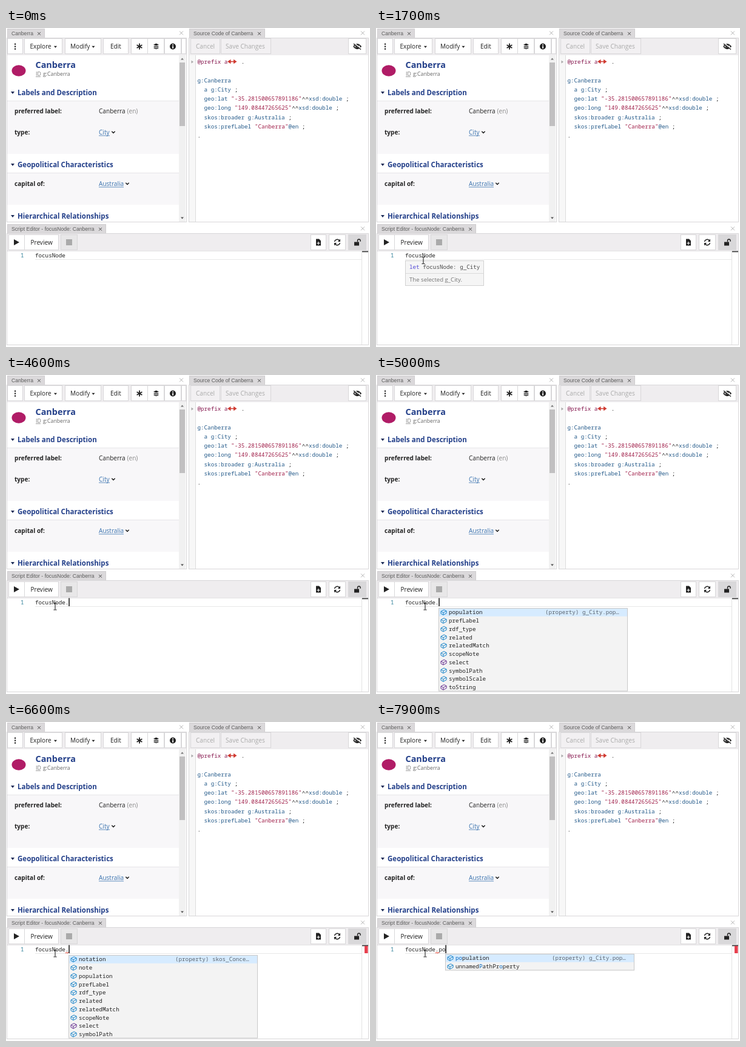
An HTML page with a canvas that plays this animation: 600x527 px, repeating every 8000 ms.

```html
<!DOCTYPE html>
<html lang="en">
<head>
<meta charset="utf-8">
<title>Script editor</title>
<style>
  html, body { margin: 0; width: 600px; height: 527px; overflow: hidden; background: #fff; }
  canvas { display: block; }
</style>
</head>
<body>
<canvas id="stage" width="600" height="527"></canvas>
<script>
const canvas = document.getElementById('stage');
let ctx = canvas.getContext('2d');

const SANS = '"Open Sans", sans-serif';
const BODY = `10.08px ${SANS}`;
const BOLD = `bold 10.08px ${SANS}`;
const TAB = '8.64px "Liberation Sans", sans-serif';
const CODE = '9.24px "Noto Sans Mono", monospace';
const CHAR = 5.56;
const INK = '#222', NAVY = '#24408a', LINK = '#3b73af', LINE = '#d8d7d9', BAR = '#efedef';
const LOOP = 8000;

function text(s, x, y, font = BODY, color = INK) {
  ctx.font = font;
  ctx.fillStyle = color;
  ctx.fillText(s, x, y);
}

// Alternating text and colour, one after another on the code grid.
function code(x, y, ...runs) {
  for (let i = 0; i < runs.length; i += 2) {
    text(runs[i], x, y, CODE, runs[i + 1]);
    x += runs[i].length * CHAR;
  }
}

function rect(x, y, w, h, fill, stroke) {
  if (fill) { ctx.fillStyle = fill; ctx.fillRect(x, y, w, h); }
  if (stroke) {
    ctx.strokeStyle = stroke;
    ctx.lineWidth = 1;
    ctx.strokeRect(x + .5, y + .5, w - 1, h - 1);
  }
}

function path(d, x, y, color, width) {
  const p = new Path2D(d);
  ctx.save();
  ctx.translate(x, y);
  if (width) {
    ctx.strokeStyle = color;
    ctx.lineWidth = width;
    ctx.stroke(p);
  } else {
    ctx.fillStyle = color;
    ctx.fill(p);
  }
  ctx.restore();
}

const cross = (x, y, r, color) => path(`M${-r} ${-r}L${r} ${r}M${r} ${-r}L${-r} ${r}`, x, y, color, 1);
const caretDown = (x, y, size = 2.6) => path(`M${-size} -1.3H${size}L0 1.7Z`, x, y, INK);
const chevron = (x, y) => path('M-2.7 -1.3L0 1.4L2.7 -1.3', x, y, INK, 1.5);

function tab(x, y, w, label, closeX) {
  rect(x, y, w, 16, '#dbd9db', '#cfcdcf');
  text(label, x + 7, y + 11.4, TAB, '#5c5c5c');
  cross(x + w - 9.5, y + 8.3, 2.4, '#444');
  cross(closeX, y + 7.3, 3, '#b5b5b5');
}

function button(x, y, w, label, labelX, color = INK, fill = '#fff') {
  rect(x, y, w, 26, fill, LINE);
  if (label) text(label, labelX, y + 17, BODY, color);
}

function section(y, title) {
  path('M-3 -2H3L0 2Z', 11, y - 4, '#1c2c58');
  text(title, 19, y, `bold 11.52px ${SANS}`, NAVY);
}

function shade(y, h) {
  rect(2, y, 283, h, '#f8f7f9');
  rect(2, y, 283, 1, '#e6e5e8');
}

function link(label, x, y, w) {
  text(label, x, y, BODY, LINK);
  rect(x, y + 1.5, w, .8, LINK);
  chevron(x + w + 6, y - 4);
}

function drawForm() {
  tab(2, 1, 62, 'Canberra', 289);
  rect(1, 16, 297, 305, '#fff', LINE);
  rect(2, 17, 295, 28, BAR);
  button(2, 17, 26);
  for (const y of [26.5, 30.5, 34.5]) rect(14, y - 1, 2.2, 2.2, INK);
  button(30, 17, 63, 'Explore', 39.5);
  caretDown(81.5, 31);
  button(97, 17, 60, 'Modify', 106);
  caretDown(144, 31);
  button(160, 17, 42, 'Edit', 172);
  for (const x of [206, 233, 261]) button(x, 17, 28);
  button(289, 17, 8);
  path('M0 -5V5M-4.4 -2.6L4.4 2.6M-4.4 2.6L4.4 -2.6', 220, 30.5, INK, 1.8);
  path('M-4.5 -3L0 -5L4.5 -3L0 -1ZM-4.5 -.3L-2.8 -1L0 .3L2.8 -1L4.5 -.3L0 1.8ZM-4.5 2.4L-2.8 1.6L0 2.9L2.8 1.6L4.5 2.4L0 4.5Z', 247.5, 30.5, INK);
  path('M5 0A5 5 0 1 1 -5 0A5 5 0 1 1 5 0', 275, 30.5, INK);
  rect(274.2, 27, 1.8, 1.7, '#fff');
  rect(274.2, 29.7, 1.8, 4, '#fff');

  path('M11.5 0A11.5 9.3 0 1 1 -11.5 0A11.5 9.3 0 1 1 11.5 0', 21, 70.5, '#b01c66');
  text('Canberra', 48.5, 66, `bold 14.4px ${SANS}`, NAVY);
  text('ID', 49, 79, `8.7px ${SANS}`, '#777');
  rect(49, 80.3, 8, .7, '#777');
  text('g:Canberra', 61, 79, `8.7px ${SANS}`, '#666');

  section(111, 'Labels and Description');
  shade(120, 88);
  text('preferred label:', 14, 141, BOLD);
  text('Canberra', 153, 141);
  text('(en)', 199.5, 141, BODY, '#888');
  text('type:', 14, 176, BOLD);
  link('City', 153, 176, 18);
  section(230, 'Geopolitical Characteristics');
  shade(239, 53);
  text('capital of:', 14, 261, BOLD);
  link('Australia', 153, 261, 41);
  section(315, 'Hierarchical Relationships');

  rect(285, 45, 11, 275, '#f1f1f1');
  rect(286, 57, 9, 105, '#c1c0c1');
  path('M-2.5 1.5H2.5L0 -1.5Z', 290.5, 51, '#777');
  path('M-2.5 -1.5H2.5L0 1.5Z', 290.5, 314, '#555');
}

function drawSource() {
  const name = '#245a8a', value = '#a0204a', dark = '#222';
  tab(302, 1, 125, 'Source Code of Canberra', 588);
  rect(301, 16, 297, 305, '#fff', LINE);
  rect(302, 17, 295, 28, BAR);
  button(304, 17, 49, 'Cancel', 313, '#aaa', '#f2f0f2');
  button(354, 17, 83, 'Save Changes', 362, '#aaa', '#f2f0f2');
  button(564, 17, 30);
  path('M-6 0Q0 -7.5 6 0Q0 7.5 -6 0M2.2 0A2.2 2.2 0 1 1 -2.2 0A2.2 2.2 0 1 1 2.2 0', 579, 30.5, INK, 1.7);
  path('M-5.5 -5L6 4', 579, 30, '#fff', 2.2);
  path('M-6 -4.5L6 5', 579, 30.5, INK, 1.4);
  rect(302, 45, 10, 275, '#f7f7f7');
  rect(312, 45, 1, 275, '#ddd');
  path('M-1.5 -2.5L2 0L-1.5 2.5Z', 307, 56, '#aaa');

  const row = i => 59 + i * 15.25, x = 315.5;
  code(x, row(0), '@prefix a', '#86184e', '   ', dark, ' .', dark);
  path('M-5 0H5M-3 -2.4L-6.5 0L-3 2.4ZM3 -2.4L6.5 0L3 2.4Z', 372.8, row(0) - 3.5, '#cf382f', 1.4);
  code(x, row(2), 'g:Canberra', name);
  code(x, row(3), '  a g:City', name, ' ;', dark);
  code(x, row(4), '  geo:lat ', name, '"-35.281500657891186"', value, '^^', dark, 'xsd:double', name, ' ;', dark);
  code(x, row(5), '  geo:long ', name, '"149.08447265625"', value, '^^', dark, 'xsd:double', name, ' ;', dark);
  code(x, row(6), '  skos:broader g:Australia', name, ' ;', dark);
  code(x, row(7), '  skos:prefLabel ', name, '"Canberra"', value, '@en', name, ' ;', dark);
  code(x, row(8), '.', dark);
}

function drawEditorFrame() {
  tab(2, 324, 163, 'Script Editor - focusNode: Canberra', 588);
  rect(1, 339, 597, 185, '#fff', LINE);
  rect(2, 340, 595, 28, BAR);
  rect(2, 368, 595, 1, '#e2e1e3');
  button(4, 341, 27);
  path('M-4 -5L5 0L-4 5Z', 17, 354, INK);
  button(30, 341, 57, 'Preview', 40.4);
  button(90, 341, 28, '', 0, INK, '#e8e7e8');
  rect(99, 349, 10, 10, '#aaa');
  button(502, 341, 26);
  path('M-4 -5.5H1L4 -2.5V5.5H-4Z', 515, 354, INK);
  path('M0 -1V4M-2.5 1.5H2.5', 515, 354, '#fff', 1.2);
  button(532, 341, 28);
  path('M-4.5 -1A4.6 4.6 0 0 1 3.5 -3M4.5 1A4.6 4.6 0 0 1 -3.5 3', 546, 354, INK, 1.5);
  path('M5 -5.5V-1H.8ZM-5 5.5V1H-.8Z', 546, 354, INK);
  button(564, 341, 30, '', 0, INK, '#d9d8da');
  rect(574, 353.5, 8, 6, INK);
  path('M1.5 0V-2.2A2.3 2.3 0 0 1 6.1 -2.2V-.8', 578, 353.5, INK, 1.4);
  rect(48, 382, 538, 1, '#e8e8e8');
  rect(586, 369, 1, 154, '#e4e4e4');
  rect(587, 368.5, 10, 1.8, '#444');
  code(24, 379, '1', '#237893');
}

// Paint the unchanging parts once.
const backdrop = document.createElement('canvas');
backdrop.width = 600;
backdrop.height = 527;
function paintBackdrop() {
  const screen = ctx;
  ctx = backdrop.getContext('2d');
  rect(0, 0, 600, 527, '#fff');
  drawForm();
  drawSource();
  drawEditorFrame();
  ctx = screen;
}

const members = ('narrower narrowerConceptCount notation note population prefLabel rdf_type ' +
  'related relatedMatch scopeNote select symbolPath symbolScale toString').split(' ');
const methods = ['select', 'toString'];

function drawList(x, y, items, detail, typed = '') {
  const pitch = 13.75, bottom = Math.min(523.5, y + items.length * pitch);
  ctx.save();
  ctx.beginPath();
  ctx.rect(x, y, 312, bottom - y + .5);
  ctx.clip();
  rect(x, y, 312, bottom - y, '#f3f3f3');
  rect(x, y, 312, pitch, '#d6ebff');
  items.forEach((item, i) => {
    const base = y + i * pitch + 10.3;
    const tint = methods.includes(item) ? '#652d90' : '#1683c9';
    path('M-4.5 -1.6L.6 -4.2L4.6 -2.2V1.6L-.6 4.3L-4.5 2.2ZM-4.5 -1.6L-.6 .5L4.6 -2.2M-.6 .5V4.3', x + 8.5, base - 3.2, tint, 1);
    let next = 0;
    [...item].forEach((letter, k) => {
      const hit = next < typed.length && letter.toLowerCase() === typed[next] &&
        (k === 0 || next > 0 || letter === 'P');
      if (hit) next++;
      text(letter, x + 17 + k * CHAR, base, CODE, hit ? '#0066bf' : INK);
    });
  });
  code(x + 176, y + 10.3, '(property) ' + detail + '…', '#5c6670');
  ctx.restore();
  rect(x, y, 312, bottom - y, null, '#c8c8c8');
}

function drawTooltip(alpha) {
  ctx.globalAlpha = alpha;
  rect(48, 384, 130, 42, '#f3f3f3', '#c8c8c8');
  rect(48, 405, 130, 1, '#d4d4d4');
  code(55, 398, 'let', '#2a1fd0', ' focusNode: g_City', INK);
  text('The selected g_City.', 55, 419, `9.6px ${SANS}`, '#555');
  ctx.globalAlpha = 1;
}

function drawPointer(t) {
  if (t < 600) return;
  const p = Math.min(1, (t - 600) / 700);
  const left = (1 - p) ** 3;
  const nudge = Math.max(0, Math.min(1, (t - 4000) / 300));
  path('M-2.5 -5.5H-.6L0 -5L.6 -5.5H2.5M0 -5V5M-2.5 5.5H-.6L0 5L.6 5.5H2.5',
    78 + 321 * left + 3 * nudge, 384 + 108 * left - 1.5 * nudge, '#111', 1);
}

function draw(t) {
  ctx.drawImage(backdrop, 0, 0);
  const typed = t < 4600 ? '' : t < 7600 ? '.' : t < 7800 ? '.p' : '.po';
  code(48, 379, 'focusNode' + typed, INK);

  if (t >= 1600 && t < 4600) drawTooltip(Math.min(1, .6 + (t - 1600) / 500));
  if (t >= 5200) {
    path('M0 1L1.5 -.5L3 1L4.5 -.5L6 1', 98, 381, '#e51400', 1);
    rect(591, 370, 5.5, 12, '#e8404f');
  }
  if (t >= 7800) {
    drawList(114, 383, ['population', 'unnamedPathProperty'], 'g_City.pop', 'po');
  } else if (t >= 7600) {
    drawList(109, 383, ['population', 'prefLabel', 'symbolPath', 'unnamedPathProperty'], 'g_City.pop', 'p');
  } else if (t >= 4900) {
    const top = 4 - [6200, 6500, 6900, 7200].filter(step => t >= step).length;
    drawList(103, 385, members.slice(top, top + 10), top === 4 ? 'g_City.pop' : 'skos_Conce');
  }

  const lastKey = t >= 7800 ? 7800 : t >= 7600 ? 7600 : 4600;
  if (t >= 4600 && (t - lastKey) % 1000 < 500) {
    rect(47.7 + (9 + typed.length) * CHAR, 368.5, 1.5, 13.5, '#111');
  }
  drawPointer(t);
}

paintBackdrop();
const start = performance.now();
function tick() {
  const t = (performance.now() - start) % LOOP;
  draw(Math.floor(t / 100) * 100);
  requestAnimationFrame(tick);
}
tick();
</script>
</body>
</html>
```
